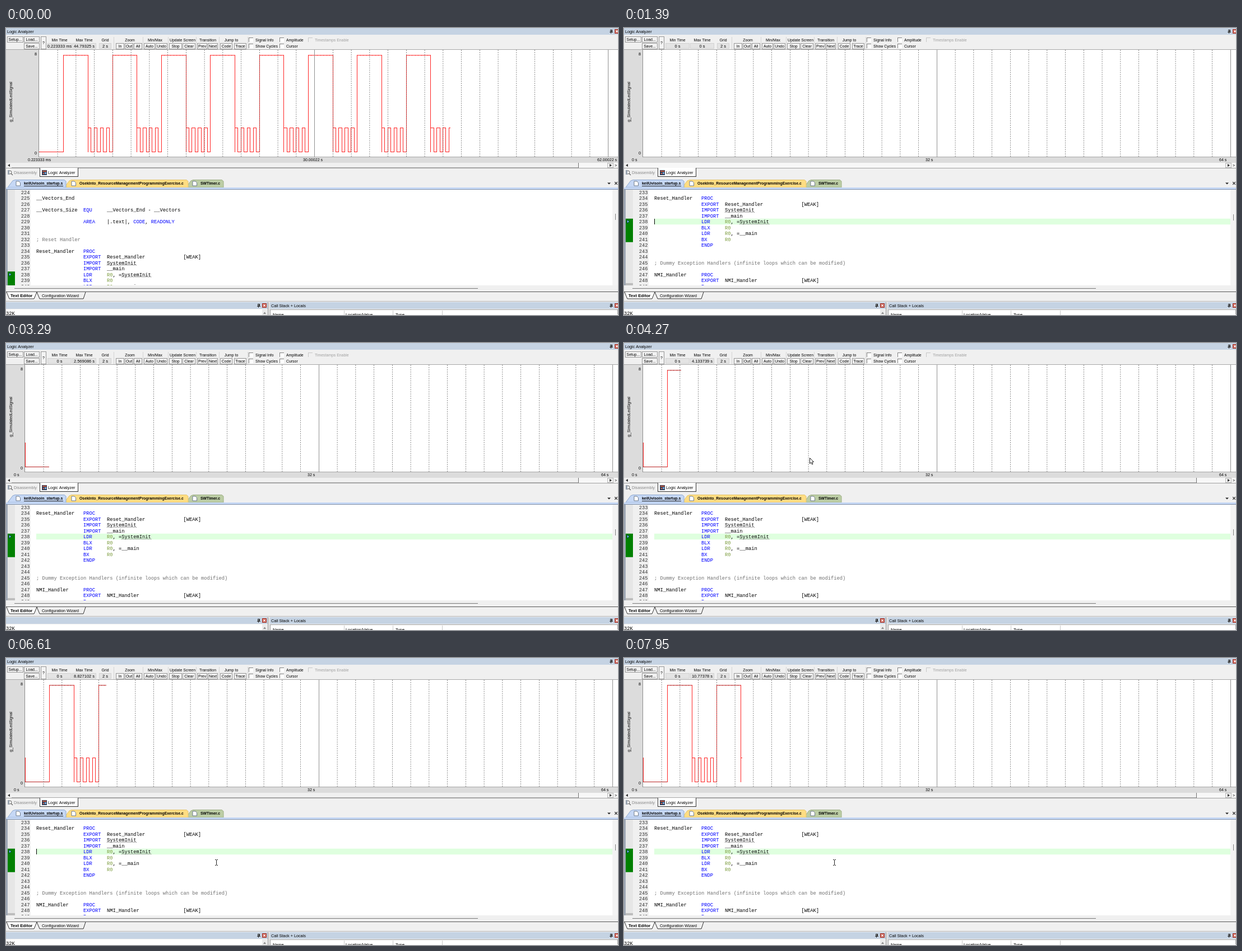
An HTML page with a canvas for the animation above (8 s loop, 1092 by 513 pixels).

```html
<!DOCTYPE html>
<html lang="en">
<head>
<meta charset="utf-8">
<title>Logic Analyzer</title>
<style>
html, body { margin: 0; width: 100%; height: 100%; overflow: hidden; background: #f0f0f0; }
canvas { display: block; }
</style>
</head>
<body>
<canvas id="stage" width="1092" height="513"></canvas>
<script>
const ctx = document.getElementById('stage').getContext('2d');
const LOOP = 8000, JUMP = 1320, RESET = 1390, RUN = 1860;
const PX_PER_S = 16.375, LINE = 10.5, CHAR = 5.25;
const SANS = '"Liberation Sans", Arial, sans-serif';
const MONO = '"Liberation Mono", monospace';
const RED = '#ff2424', DARK_RED = '#b82020';

// [clock ms, simulated seconds]
const RUN_KEYS = [[1860, 0.45], [2260, 1.080388], [4270, 4.133739], [5420, 5.840417],
  [5950, 7.74], [6610, 8.827102], [7950, 10.77378], [8000, 10.85]];
// [clock ms, x, y]
const POINTER_KEYS = [[4060, 210, 140], [4270, 331, 205], [4340, 331, 205], [4830, 375, 365], [8000, 375, 365]];

const CODE = {
  225: '__Vectors_End',
  227: '__Vectors_Size  EQU     __Vectors_End - __Vectors',
  229: '                AREA    |.text|, CODE, READONLY',
  232: '; Reset Handler',
  234: 'Reset_Handler   PROC',
  235: '                EXPORT  Reset_Handler             [WEAK]',
  236: '                IMPORT  SystemInit',
  237: '                IMPORT  __main',
  238: '                LDR     R0, =SystemInit',
  239: '                BLX     R0',
  240: '                LDR     R0, =__main',
  241: '                BX      R0',
  242: '                ENDP',
  245: '; Dummy Exception Handlers (infinite loops which can be modified)',
  247: 'NMI_Handler     PROC',
  248: '                EXPORT  NMI_Handler               [WEAK]',
  249: '                B       .'
};
const KEYWORD = /^(EQU|AREA|CODE|READONLY|PROC|EXPORT|IMPORT|LDR|BLX|BX|ENDP|B)$/;

function box(x, y, w, h, fill, edge) {
  if (edge) { ctx.fillStyle = edge; ctx.fillRect(x, y, w, h); x++; y++; w -= 2; h -= 2; }
  ctx.fillStyle = fill;
  ctx.fillRect(x, y, w, h);
}
function shape(points, fill, edge) {
  ctx.beginPath();
  points.forEach(([x, y]) => ctx.lineTo(x, y));
  ctx.closePath();
  ctx.fillStyle = fill;
  ctx.fill();
  if (edge) { ctx.strokeStyle = edge; ctx.lineWidth = 1; ctx.stroke(); }
}
function stroke(points, color, width = 1) {
  ctx.beginPath();
  for (let i = 0; i < points.length; i += 2) {
    ctx.moveTo(...points[i]);
    ctx.lineTo(...points[i + 1]);
  }
  ctx.strokeStyle = color;
  ctx.lineWidth = width;
  ctx.stroke();
}
// y is the middle of the capitals
function text(s, x, y, { size = 6.9, color = '#000', align = 'left', font = SANS, weight = '' } = {}) {
  ctx.font = `${weight} ${size}px ${font}`;
  ctx.textAlign = align;
  ctx.fillStyle = color;
  ctx.fillText(s, x, y + size * 0.36);
}
function cross(x, y, r, color, width = 1.2) {
  stroke([[x - r, y - r], [x + r, y + r], [x - r, y + r], [x + r, y - r]], color, width);
}
function track(keys, t) {
  let i = 0;
  while (i < keys.length - 2 && t >= keys[i + 1][0]) i++;
  const [a, b] = [keys[i], keys[i + 1]];
  const held = Math.floor((t - a[0]) / 70) * 70;
  const p = held / (b[0] - a[0]);
  return a.slice(1).map((v, j) => v + (b[j + 1] - v) * p);
}

function caption(x, y, w, title, closeX) {
  box(x, y, w, 12, '#c5d3e3');
  text(title, x + 2, y + 6, { size: 7.25 });
  const pin = closeX - 9;
  box(pin - 1, y + 3, 4, 4, '#333');
  box(pin, y + 4, 1, 2, '#c5d3e3');
  box(pin - 2, y + 7, 6, 1, '#333');
  box(pin, y + 8, 1, 2, '#333');
  box(closeX - 2, y + 2, 8, 8, '#c9574b', '#a33a30');
  cross(closeX + 2, y + 6, 1.8, '#fff');
}
function button(label, x, y, w, h = 11) {
  box(x, y, w, h, '#f3f3f3', '#969696');
  text(label, x + w / 2, y + h / 2, { align: 'center' });
}
function checkbox(label, x, y, off) {
  box(x, y, 8, 8, off ? '#c8c8c8' : '#808080');
  box(x + 1, y + 1, 7, 7, off ? '#f0f0f0' : '#fff');
  text(label, x + 12, y + 4.5, { color: off ? '#a0a0a0' : '#000' });
}
function field(label, value, x, w) {
  const mid = x + w / 2;
  text(label, mid, 21.5, { align: 'center' });
  box(x, 27, w, 10, '#e4e4e4', '#d2d2d2');
  text(value, mid, 32, { align: 'center', size: 7.5 });
}

function toolbar(minTime, maxTime) {
  caption(0, 0, 1092, 'Logic Analyzer', 1088);
  box(0, 12, 1092, 27, '#f0f0f0');
  button('Setup...', 2, 15, 29);
  button('Load...', 32, 15, 28);
  button('Save...', 32, 27, 28);
  button('?', 62, 15, 10, 23);
  field('Min Time', minTime, 74, 43);
  field('Max Time', maxTime, 118, 43);
  field('Grid', '2 s', 166, 22);
  [192, 244, 289, 339, 380, 431].forEach(x => box(x, 16, 1, 22, '#d4d4d4'));
  [['Zoom', 221], ['Min/Max', 266], ['Update Screen', 315], ['Transition', 360], ['Jump to', 402]]
    .forEach(([s, x]) => text(s, x, 21.5, { align: 'center' }));
  [['In', 196, 15], ['Out', 212, 15], ['All', 228, 15], ['Auto', 246, 20], ['Undo', 267, 21],
    ['Stop', 291, 23], ['Clear', 315, 23], ['Prev', 341, 18], ['Next', 360, 18],
    ['Code', 382, 22], ['Trace', 407, 22]].forEach(([s, x, w]) => button(s, x, 27, w));
  checkbox('Signal Info', 433, 17);
  checkbox('Show Cycles', 433, 28);
  checkbox('Amplitude', 488, 17);
  checkbox('Cursor', 488, 28);
  checkbox('Timestamps Enable', 539, 17, true);
}

// Level during the n-th third of a second
function level(n) {
  if (n < 8) return 0;
  const m = (n - 8) % 16;
  return m < 8 ? 8 : m % 2 ? 0 : 2;
}
const levelY = { 0: 221, 2: 178, 8: 48.3 };

function signal(x0, end, live) {
  if (live) box(x0, 178, 1, 43, RED);
  for (let n = 0; n / 3 < end; n++) {
    const now = level(n), y = levelY[now];
    const x = Math.floor(x0 + n / 3 * PX_PER_S);
    const right = Math.floor(x0 + Math.min((n + 1) / 3, end) * PX_PER_S);
    box(x, y, right - x + 1, 1, live && (n < 8 || now === 8) ? DARK_RED : RED);
    const before = n ? level(n - 1) : now;
    if (before !== now) {
      const top = Math.min(levelY[before], y);
      const bottom = before === 8 ? levelY[0] : Math.max(levelY[before], y);
      box(x, top, 1, bottom - top + 1, RED);
    }
  }
}

function graph(live, end) {
  const x0 = live ? 34 : 59, middle = live ? 16 : 15, last = live ? 32 : 31;
  box(0, 39, 1092, 202, '#dcdcdc');
  box(x0, 39, 1092 - x0, 192, '#fff');
  box(0, 38, 1092, 1, '#a8a8a8');
  box(x0 - 1, 39, 1, 192, '#8c8c8c');
  box(x0, 230, 1092 - x0, 1, '#a8a8a8');
  if (end > 0) signal(x0, end, live);
  for (let k = 1; k <= last; k++) {
    const x = x0 + k * 2 * PX_PER_S;
    if (k === middle || k === last) box(Math.floor(x), 39, 1, 192, '#909090');
    else for (let y = 39; y < 229; y += 3.94) box(x, y, 0.7, 1.97, '#505050');
  }
  text('8', x0 - 4, 46.5, { size: 7.2, align: 'right' });
  text('0', x0 - 4, 223.5, { size: 7.2, align: 'right' });
  const marks = live ? [['0 s', 14], ['32 s', 538], ['64 s', 1062]]
    : [['0.223333 ms', 39], ['30.00022 s', 530], ['62.00022 s', 1055]];
  marks.forEach(([s, x]) => text(s, x, 235.5, { size: 7.1 }));
  ctx.save();
  ctx.translate(8.7, 168);
  ctx.rotate(-Math.PI / 2);
  text('g_SimulatedLedSignal', 0, 0, { size: 7.2 });
  ctx.restore();
}

function graphScroll(thumb) {
  box(0, 241, 1092, 10, '#f7f7f7');
  if (thumb) {
    box(10, 241, 1011, 9, '#f0f0f0');
    box(10, 249, 1012, 1, '#a8a8a8');
    box(1021, 241, 1, 9, '#707070');
  }
  box(0, 241, 10, 9, '#f0f0f0');
  box(1073, 241, 11, 9, '#f0f0f0', '#b8b8b8');
  shape([[3, 245.5], [7, 243], [7, 248]], '#333');
  shape([[1081, 245.5], [1077, 243], [1077, 248]], '#333');
  text('>', 1086, 245.5, { size: 7 });
  box(0, 250, 1092, 1, '#a0a0a0');
}

function viewTabs() {
  box(0, 251, 1092, 20, '#f0f0f0');
  ctx.beginPath();
  ctx.arc(7, 258, 3, 0, 7);
  ctx.strokeStyle = '#666';
  ctx.lineWidth = 1;
  ctx.stroke();
  stroke([[9, 260], [12, 263]], '#666', 1.3);
  box(3, 254, 3, 8, '#9aa4b0');
  text('Disassembly', 14, 258.5, { size: 7.2, color: '#888' });
  box(60, 250, 69, 16, '#fff', '#333');
  box(61, 250, 67, 1, '#fff');
  box(64, 254, 9, 9, '#34415a');
  box(65, 255, 7, 2, '#b9543e');
  box(66, 259, 2, 2, '#df6a50');
  box(69, 258, 3, 3, '#78a4d4');
  text('Logic Analyzer', 75, 258.5, { size: 7.4 });
}

function fileTab(label, left, right, labelX, fill, edge) {
  shape([[left, 285], [left + 9, 273], [left + 13, 271.5], [right - 3, 271.5], [right, 274], [right, 285]], fill, edge);
  shape([[labelX - 14, 274], [labelX - 9, 274], [labelX - 6.5, 276.5], [labelX - 6.5, 282], [labelX - 14, 282]], '#fff', '#6d7a8c');
  text(label, labelX, 278, { weight: 'bold' });
}
function fileTabs() {
  box(0, 270, 1092, 20, '#f0f0f0');
  fileTab('SWTimer.c', 321, 388, 347, '#bccda5', '#9fb085');
  fileTab('OsekInto_ResourceManagementProgrammingExercise.c', 104, 325, 131, '#ffdd82', '#e4c570');
  fileTab('keilUvisoin_startup.s', 3, 107, 32, '#c6d8f5', '#8fa9d0');
  box(32, 282, 70, 1, '#202020');
  shape([[1073, 276.5], [1079, 276.5], [1076, 279.5]], '#222');
  cross(1088.5, 277.5, 2.3, '#222');
  box(0, 285, 1092, 3, '#c6d8f5');
  box(0, 288, 1092, 1, '#7d8da5');
}

function codeLine(s, y) {
  const style = { size: 8.75, font: MONO };
  if (s[0] === ';') return text(s, 54, y, { ...style, color: '#707070' });
  for (const { 0: word, index } of s.matchAll(/\w+|[^\w\s]+/g)) {
    const x = 54 + index * CHAR;
    const color = KEYWORD.test(word) ? '#0000ff' : word === 'R0' ? '#7a9a3a' : '#000';
    text(word, x, y, { ...style, color });
    if (word === 'SystemInit')
      for (let d = 0; d < word.length * CHAR; d += 2) box(x + d, y + 4, 1, 1, '#555');
  }
}

function editor(t) {
  const jumped = t >= JUMP, first = jumped ? 233 : 224;
  const lineY = n => 293.5 + (n - first) * LINE;
  ctx.save();
  ctx.beginPath();
  ctx.rect(0, 289, 1092, 171);
  ctx.clip();
  box(0, 289, 1092, 171, '#fff');
  box(0, 289, 3, 171, '#9fa8b5');
  box(3, 289, 13, 171, '#e6e6e6');
  box(16, 289, 28, 171, '#f0f0f0');
  box(1082, 289, 10, 171, '#f3f3f3');
  box(1087, jumped ? 333 : 332, 1, 11, '#808080');
  const pcY = lineY(238);
  box(3, pcY - LINE / 2, 13, 4 * LINE, '#008000');
  if (jumped) {
    box(3, 456, 13, 4, '#bdbdbd');
    box(54, pcY - LINE / 2, 1028, LINE, '#dfffdf');
  }
  const arrow = (x, fill) => shape([[x, pcY - 3], [x + 4, pcY], [x, pcY + 3]], fill, '#103050');
  arrow(5.5, '#70dcec');
  if (jumped && t < RESET) arrow(10.5, '#ffe860');
  for (let n = first; n < first + 17; n++) {
    text(n, 42.5, lineY(n), { size: 8.75, font: MONO, align: 'right', color: '#333' });
    if (CODE[n]) codeLine(CODE[n], lineY(n));
  }
  const blink = Math.max(0, Math.floor((t - 1889) / 505));
  if (jumped && (t < RUN || blink % 2)) box(54, 341, 1, 10, '#000');
  ctx.restore();
}

function editorFooter() {
  box(0, 460, 1092, 53, '#f0f0f0');
  box(15, 465, 827, 1, '#777');
  box(0, 471, 1092, 1, '#555');
  shape([[1, 472], [6, 484], [50, 484], [55, 472]], '#fff');
  stroke([[1, 472], [6, 484], [6, 484], [50, 484], [50, 484], [55, 472],
    [55, 472], [60, 484], [60, 484], [138, 484], [138, 484], [142, 472]], '#333');
  text('Text Editor', 8, 478.5, { size: 7.65, weight: 'bold' });
  text('Configuration Wizard', 64, 478.5, { size: 7.07 });
  box(0, 488, 1092, 1, '#b4b4b4');
}

function bottomPanels() {
  caption(0, 490, 467, '', 459);
  box(0, 503, 467, 10, '#fff');
  box(457, 503, 10, 10, '#ececec');
  shape([[459, 511], [461.5, 507.5], [464, 511]], '#888');
  text('32K', 0, 509.5, { size: 8.75, font: MONO });
  box(467, 490, 4, 23, '#e0e0e0');
  box(467, 490, 1, 23, '#999');
  caption(471, 490, 621, 'Call Stack + Locals', 1088);
  box(471, 503, 621, 10, '#fff', '#a0a0a0');
  box(472, 512, 620, 1, '#fff');
  [603, 690, 778].forEach(x => box(x, 505, 1, 8, '#c8c8c8'));
  [['Name', 476], ['Location/Value', 606], ['Type', 695]].forEach(([s, x]) => text(s, x, 512, { size: 7.4 }));
}

function pointer(t) {
  if (t < POINTER_KEYS[0][0]) return;
  const [x, y] = track(POINTER_KEYS, t).map(Math.round);
  if (y > 289) {
    box(x, y - 4, 1, 9, '#222');
    [-5, 5].forEach(d => { box(x - 2, y + d, 2, 1, '#222'); box(x + 1, y + d, 2, 1, '#222'); });
  } else {
    shape([[0, 0], [0, 10], [2.3, 8], [4, 11.5], [5.5, 10.8], [4, 7.3], [7, 7]]
      .map(([a, b]) => [x + 0.5 + a, y + 0.5 + b]), '#fff', '#222');
  }
}

function draw(t) {
  const live = t >= RESET;
  let end = 44.79325;
  if (live) end = t < RUN ? 0 : track(RUN_KEYS, t)[0];
  box(0, 0, 1092, 513, '#f0f0f0');
  toolbar(live ? '0 s' : '0.223333 ms', end ? `${end.toPrecision(7)} s` : '0 s');
  graph(live, end);
  graphScroll(t < RESET || t >= RUN);
  viewTabs();
  fileTabs();
  editor(t);
  editorFooter();
  bottomPanels();
  pointer(t);
}

let start;
function tick() {
  const now = performance.now();
  start ??= now;
  draw((now - start) % LOOP);
  requestAnimationFrame(tick);
}
tick();
</script>
</body>
</html>
```
